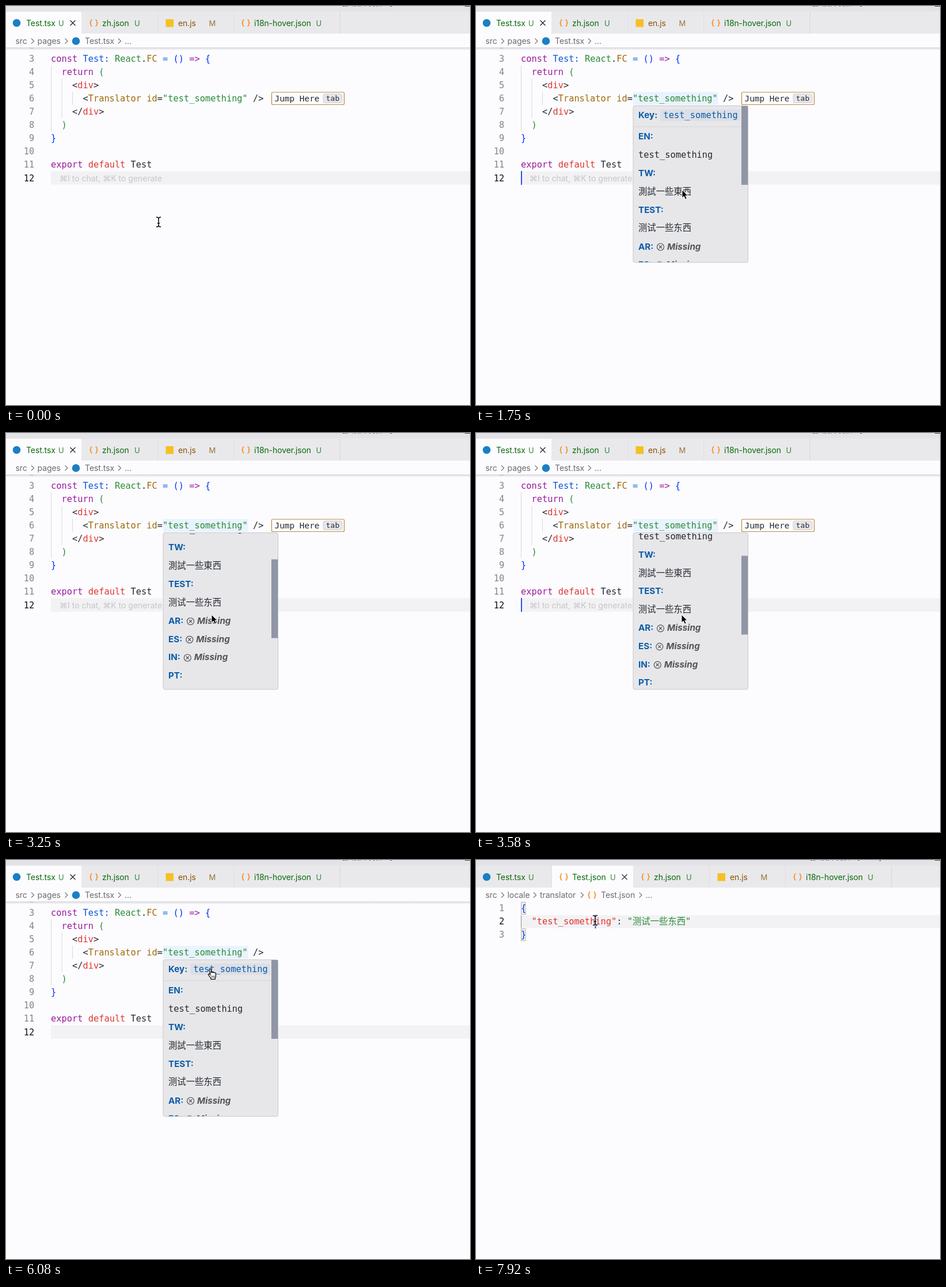
An HTML page for the animation above (8000 ms loop, 806x694 px).

```html
<!DOCTYPE html>
<html lang="en">
<head>
<meta charset="utf-8">
<title>Translation hover</title>
<style>
html, body { margin: 0; width: 100%; height: 100%; overflow: hidden; background: #fcfcff; }
svg { display: block; width: 806px; height: 694px; }
text { white-space: pre; font: 14px Inter, "Noto Sans CJK SC", sans-serif; }
.code { font: 15.35px "DejaVu Sans Mono", "Noto Sans CJK SC", monospace; fill: #24292e; }
.tw { font-family: "Noto Sans CJK TC", sans-serif; }
.num { text-anchor: end; fill: #85858a; }
.num.on { fill: #111; }
.tab { letter-spacing: -.1px; }
.crumb { fill: #6c6c70; letter-spacing: -.05px; }
.label { font-size: 15.2px; font-weight: 700; fill: #0a5ca8; }
.miss { font-size: 15.2px; font-weight: 700; font-style: italic; fill: #555; }
.line { fill: none; stroke-width: 1.2; }
.k { fill: #9b1a9b; } .b { fill: #0b55d9; } .n { fill: #0431fa; } .g { fill: #2b8a35; }
.o { fill: #9d6a08; } .r { fill: #df352f; } .e { fill: #0b70d0; }
</style>
</head>
<body>
<svg id="stage" viewBox="0 0 806 694"></svg>
<script>
const GREEN = '#0a6b0a', BROWN = '#895503', COL = 9.24, ROW = 23.1;

const text = (x, y, s, cls, extra = '') => `<text x="${x}" y="${y}" class="${cls}" ${extra}>${s}</text>`;
const rect = (x, y, w, h, fill, extra = '') =>
  `<rect x="${x}" y="${y}" width="${w}" height="${h}" fill="${fill}" ${extra}/>`;
const path = (d, stroke, extra = '') => `<path class="line" d="${d}" stroke="${stroke}" ${extra}/>`;
const group = (id, body, extra = '') => `<g id="${id}" ${extra}>${body}</g>`;

// Colours a line written as "k:const| |b:Test:"
const paint = s => s.split('|').map(p => {
  const [, cls, body] = p.match(/^(?:([a-z]):)?(.*)$/);
  const safe = body.replace(/</g, '&lt;').replace(/>/g, '&gt;');
  return cls ? `<tspan class="${cls}">${safe}</tspan>` : safe;
}).join('');

const icons = {
  dot: (x, y) => `<circle cx="${x}" cy="${y}" r="6.8" fill="#1a7fc4"/>`,
  js: (x, y) => rect(x - 7, y - 6.5, 13.5, 13.5, '#f5c022'),
  json: (x, y) => path('M-3 -5.5q-2.2 0 -2.2 2.2v1.3q0 2 -2 2q2 0 2 2v1.3q0 2.2 2.2 2.2' +
    'M3 -5.5q2.2 0 2.2 2.2v1.3q0 2 2 2q-2 0 -2 2v1.3q0 2.2 -2.2 2.2',
    '#f58f22', `transform="translate(${x} ${y})" style="stroke-width:1.6"`)
};

function tab(x, w, icon, name, mark, markX, active, italic) {
  const color = mark === 'M' ? BROWN : GREEN, slant = italic ? 'font-style="italic"' : '';
  const cx = x + markX + 25;
  return rect(x, 10, w, 38, active ? '#fcfcff' : '#e9e9ec') +
    rect(x + w - .5, 10, 1, 38, '#d6d6da') +
    icons[icon](x + (icon === 'js' || icon === 'json' ? 20.5 : 18.5), 29.5) +
    text(x + 35, 35, name, 'tab', `fill="${color}" ${slant}`) +
    text(x + markX, 34.5, mark, '', `fill="${color}" opacity=".8" style="font-size:13px" ${slant}`) +
    (active ? path(`M${cx - 4.5} 25l9 9m0 -9l-9 9`, '#222') : '');
}

function frameBar(title, titleX, tabs) {
  let x = 0, out = rect(0, 0, 806, 48, '#e9e9ec') + rect(0, 0, 806, 9.5, '#e3e3e7');
  out += text(titleX, -1, title, '', 'fill="#444" style="font-size:13px"') + rect(797, 0, 9, 1, '#444');
  for (const [w, ...rest] of tabs) { out += tab(x, w, ...rest); x += w; }
  return out;
}

function crumbs(names, chevrons, icon, iconX) {
  return rect(0, 48, 806, 24, '#fcfcff') +
    names.map(([x, s]) => text(x, 66, s, 'crumb')).join('') +
    chevrons.map(x => path(`M${x - 2} 56.5l4.5 4.5l-4.5 4.5`, '#77777b')).join('') +
    icons[icon](iconX, 61);
}

function code(lines, first, top, current) {
  return lines.map((s, i) => {
    const y = top + i * ROW, n = first + i;
    return text(49.3, y, n, 'code num' + (n === current ? ' on' : '')) +
      (s ? text(78, y, paint(s), 'code') : '');
  }).join('');
}

const shared = [
  [132, 'json', 'zh.json', 'U', 91],
  [132, 'js', 'en.js', 'M', 88.5],
  [184, 'json', 'i18n-hover.json', 'U', 142.5]
];

const sourceView =
  rect(78, 287.5, 728, 23, '#f2f2f4') +
  rect(78, 103, 1, 115, '#d9d9de') + rect(96.5, 126, 1, 69, '#d9d9de') + rect(115, 149, 1, 23, '#d9d9de') +
  rect(273, 149.5, 147.5, 22.5, '#add6ff', 'id="mark" opacity=".25"') +
  code([
    '',
    'k:const| |b:Test:| |g:React|.|o:FC| |e:=| |n:()| |k:=>| |n:{',
    '  |k:return| |g:(',
    '    <|r:div|>',
    '      <|o:Translator| |o:id|=|g:"test_something"| />',
    '    </|r:div|>',
    '  |g:)',
    'n:}',
    '',
    'k:export| |r:default| Test',
    ''
  ], 2, 73.5, 12) +
  group('hints',
    text(93, 304.5, '⌘I to chat, ⌘K to generate', '', 'fill="#c6c6ca"') +
    rect(461.5, 150, 126, 21.5, '#fdfdff', 'rx="2" stroke="#bd8a3e" stroke-width="1.2"') +
    text(466.5, 166, 'Jump Here', 'code', 'style="font-size:14.4px"') +
    rect(551, 153, 33, 15.5, '#e6e6ec', 'rx="3" stroke="#cfcfd6"') +
    text(555.8, 165, 'tab', 'code', 'style="font-size:13px"')) +
  crumbs([[16.5, 'src'], [54.5, 'pages'], [137, 'Test.tsx'], [206, '...']], [46, 104.5, 197], 'dot', 121.5) +
  rect(0, 72, 806, 5, 'url(#shade)') +
  frameBar('[扩展开发宿主] Test.tsx', 584, [[132, 'dot', 'Test.tsx', 'U', 91, true], ...shared]);

const bracket = y => rect(78.5, y, 7.5, 21, '#e9efe9', 'stroke="#b9b9b9"');
const jsonView =
  rect(78, 96, 728, 22.5, '#f2f2f4') + rect(78, 96, 1, 22.5, '#8c8c90') +
  group('pair', bracket(73.5) + bracket(119.5)) +
  code(['n:{', '  |r:"test_something"|: |g:"测试一些东西"', 'n:}'], 1, 89, 2) +
  crumbs([[16.5, 'src'], [54.5, 'locale'], [111, 'translator'], [217, 'Test.json'], [294.5, '...']],
    [46, 102, 184, 285.5], 'json', 201.5) +
  frameBar('[扩展开发宿主] Test.json', 580,
    [[132, 'dot', 'Test.tsx', 'U', 91], [142, 'json', 'Test.json', 'U', 101, true, true], ...shared]);

const missing = (y, name, x) => text(282, y, name + ':', 'label') +
  `<circle class="line" cx="${x}" cy="${y - 4.5}" r="6" stroke="#555"/>` +
  path(`M${x - 2.5} ${y - 7}l5 5m0 -5l-5 5`, '#555') + text(x + 11.5, y, 'Missing', 'miss');
const entry = (y, name, value, cls = '') =>
  text(282, y, name + ':', 'label') + text(282, y + 31.8, value, 'code ' + cls);

const popup =
  rect(273, 173.5, 199.5, 272.5, '#e7e7ea', 'rx="3" stroke="#c9c9cd"') +
  '<g clip-path="url(#view)">' + group('list',
    rect(320, 180, 139, 20, '#dcdfe6', 'rx="3"') +
    text(282, 195, 'Key:', 'label') + text(325.5, 195, 'test_something', 'code', 'style="fill:#0a5ca8"') +
    rect(273, 209.5, 188, 1, '#d6d6da') +
    entry(232, 'EN', 'test_something') +
    entry(296, 'TW', '測試一些東西', 'tw') +
    entry(359.5, 'TEST', '测试一些东西') +
    missing(423.5, 'AR', 320.5) + missing(455.3, 'ES', 318.8) + missing(487, 'IN', 315.3) +
    entry(518.5, 'PT', 'teste something') +
    missing(582, 'TH', 320.8) + missing(614, 'TR', 319.3) + missing(646, 'VI', 314.8) +
    entry(677.5, 'ZH', '测试一些东西')) +
  rect(461, 174, 11.5, 137, '#9196a6', 'id="thumb"') + '</g>';

const tip = rect(349, 203, 169, 36, '#f3f3f5', 'rx="3" stroke="#c9c9cd"') +
  text(433.5, 226, 'Execute command', '', 'fill="#333" text-anchor="middle"');

const beam = 'M-4 -8.5q4 0 4 3v11q0 3 -4 3M4 -8.5q-4 0 -4 3v11q0 3 4 3M-2 2h4';
const cursors =
  group('beam', path(beam, '#fff', 'style="stroke-width:3.2"') + path(beam, '#000', 'style="stroke-width:1.5"')) +
  group('arrow', '<path d="M0 0v14l3.2 -3l2.4 5.2l2.6 -1.2l-2.3 -5h4.3z" fill="#000" stroke="#fff"/>') +
  group('hand', '<path d="M-2 1.5q0 -1.6 1.5 -1.6t1.6 1.6v5q1.2 -1.3 2.8 0q1.4 -1 2.7 .3q2 -.7 2.8 1v5' +
    'q0 2 -1.2 3.2v2.2h-7.2v-1.6q-2.4 -2.6 -4.7 -6.6q.6 -2 2.4 -.6l1.1 1.2z" fill="#fff" stroke="#000" stroke-width="1.2"/>' +
    path('M2 12v3.5m2.5 -3.5v3.5m2.4 -3.5v3.5', '#000', 'style="stroke-width:.9"'));

document.getElementById('stage').innerHTML =
  '<defs><linearGradient id="shade" x2="0" y2="1"><stop stop-color="#d5d5db"/>' +
  '<stop offset="1" stop-color="#d5d5db" stop-opacity="0"/></linearGradient>' +
  '<clipPath id="view"><rect x="273" y="174" width="199.5" height="271.5"/></clipPath></defs>' +
  rect(0, 0, 806, 694, '#fcfcff') +
  group('source', sourceView) + group('json', jsonView) +
  rect(0, 0, 2, 24, '#2a50e6', 'id="caret"') + group('popup', popup) + group('tip', tip) +
  group('mouse', cursors);

const el = id => document.getElementById(id);
const parts = Object.fromEntries(
  ['source', 'json', 'mark', 'hints', 'pair', 'caret', 'popup', 'list', 'thumb', 'tip', 'mouse', 'beam', 'arrow', 'hand']
    .map(id => [id, el(id)]));
const show = (id, on) => { parts[id].style.display = on ? '' : 'none'; };
const move = (id, x, y) => parts[id].setAttribute('transform', `translate(${x} ${y})`);

const mousePath = [
  [0, 265, 376], [330, 300, 262], [580, 323, 151], [667, 325, 157],
  [1417, 325, 157], [1667, 352, 300], [1750, 358, 320], [1833, 357, 316],
  [3667, 357, 316], [4000, 362, 230], [4083, 362, 230], [4333, 363, 175], [4500, 355, 190],
  [6500, 355, 189], [6833, 308, 154], [6917, 308, 154], [7333, 207, 105]
];
const scrollPath = [
  [1917, 0], [2167, 274], [2417, 274], [2667, 0], [3167, 0], [3417, 274], [3500, 190], [3583, 80], [3667, 0]
];

function at(keys, t) {
  const i = keys.findIndex(k => k[0] > t);
  if (i < 0) return keys[keys.length - 1].slice(1);
  if (i === 0) return keys[0].slice(1);
  const [a, b] = [keys[i - 1], keys[i]], p = (t - a[0]) / (b[0] - a[0]);
  return a.slice(1).map((v, j) => v + (b[j + 1] - v) * p);
}

const STEP = 1000 / 12;

function draw(now) {
  const t = Math.floor((now % 8000 + 4) / STEP) * STEP + .5;
  const switched = t >= 6250, clicked = t >= 7910;
  const open = t >= 1000 && !switched;
  const [x, y] = at(mousePath, t), [scroll] = at(scrollPath, t);

  show('source', !switched);
  show('json', switched);
  show('pair', t >= 6330);
  show('mark', open);
  show('hints', t < 6000);
  show('tip', t >= 5750 && t < 6000);

  show('popup', open);
  parts.popup.setAttribute('opacity', Math.min(1, (t - 1000) / 208));
  move('list', 0, -scroll);
  move('thumb', 0, scroll / 2);
  parts.thumb.setAttribute('fill', t < 1580 ? '#a6a6aa' : '#9196a6');

  const lit = switched ? clicked || Math.floor((t - 6250) / 500) % 2 === 0 : Math.floor(t / 500) % 2 === 1;
  show('caret', lit);
  move('caret', clicked ? 206.5 : 78, switched ? 95 : 287);

  const inside = open && x > 273 && y > 172;
  const link = inside && scroll === 0 && y > 180 && y < 200;
  move('mouse', x, y);
  show('beam', !inside);
  show('arrow', inside && !link);
  show('hand', link);
}

const start = performance.now();
function loop() {
  draw(performance.now() - start);
  requestAnimationFrame(loop);
}
loop();
</script>
</body>
</html>
```
